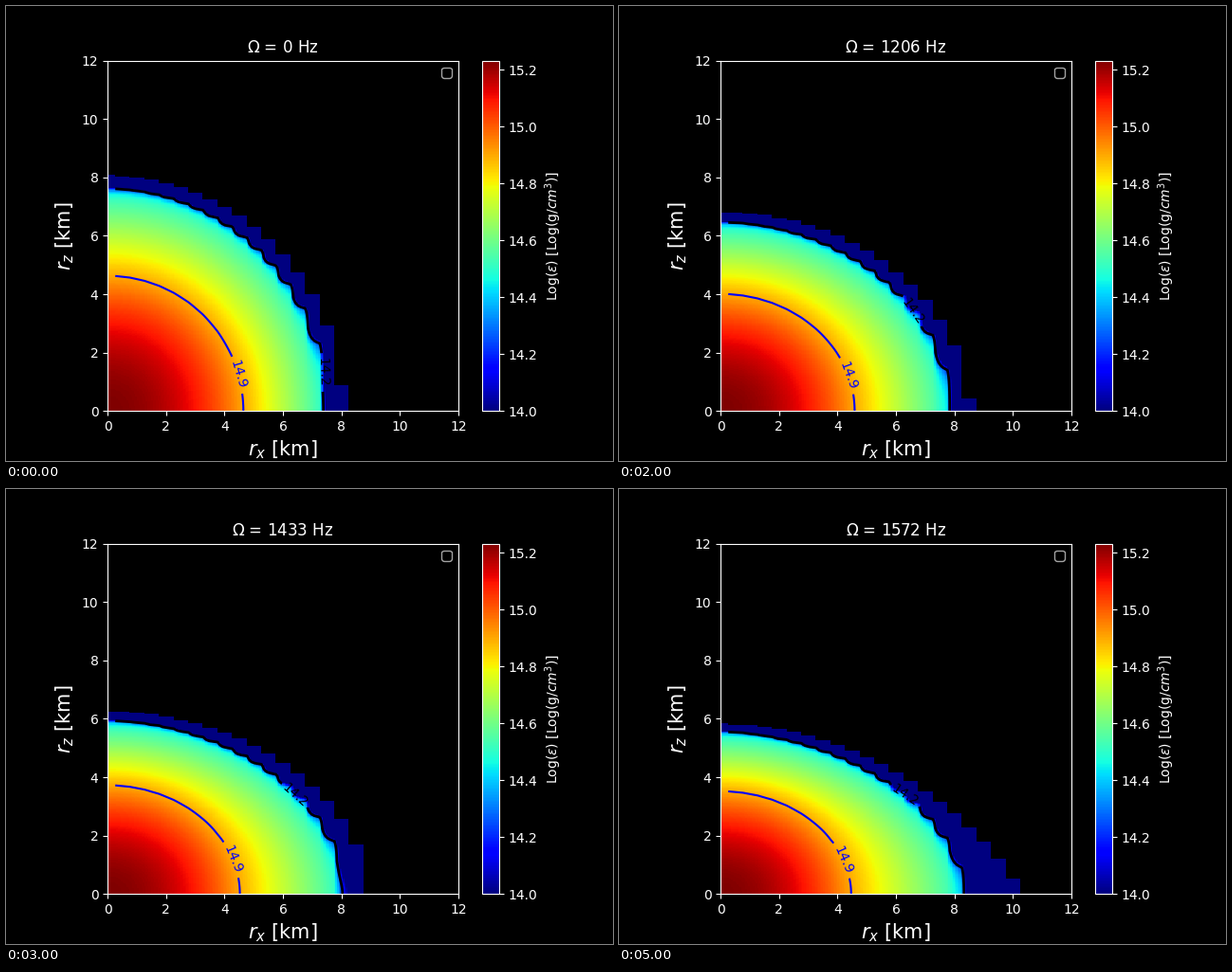
A matplotlib script for the animation above (6 s loop, 640x480 px).

```python
import numpy as np
import matplotlib.pyplot as plt
from matplotlib.animation import FuncAnimation

plt.style.use("dark_background")

SPINS = [0, 865, 1206, 1433, 1558, 1572]  # Hz
LOW, CORE, HIGH = 14.0, 14.9, 15.232
STEP, OFFSET = 0.5, 0.26  # sample spacing and first sample, in km


class Star:
    """Half-axes of the core, surface and crust for one spin."""

    def __init__(self, spin):
        w = (spin / SPINS[-1]) ** 2
        flat, bulge, shed = w**1.1, w**1.6, w**18
        self.core = (4.65 - 0.22 * w**2, 4.63 - 1.11 * flat, 2)
        self.surface = (7.62 + 0.8 * bulge, 7.62 - 2.06 * flat,
                        2 - 0.15 * w**3)
        self.crust = (8.05 + 1.1 * (bulge + shed), 8.06 - 2.23 * flat)
        self.crust_bend = 0.5 + 0.05 * bulge + 0.25 * shed
        self.surface_angle = 10 if w < 0.4 else 28

    def density(self, x, z):
        """Log density: parabolic core, linear mantle, steep outer drop."""
        core = gauge(x, z, *self.core)
        ratio = core / gauge(x, z, *self.surface)
        s = (core - 1) / (ratio - 1)  # 0 on the core, 1 on the surface
        t = np.clip(s, 0, 1)
        mantle = CORE - 0.43 * t - 0.27 * t**25
        outside = np.maximum(14.2 - 20 * (s - 1), 13)
        return np.where(core < 1, HIGH - (HIGH - CORE) * core**2,
                        np.where(s < 1, mantle, outside))

    def crust_top(self, x):
        a, b = self.crust
        return b * np.maximum(1 - (x / a) ** 2, 0) ** self.crust_bend


def gauge(x, z, a, b, n):
    """Scaled radius, 1 on the curve with half-axes a and b."""
    return ((x / a) ** n + (z / b) ** n) ** (1 / n)


def on_curve(angle, curve):
    """Point of a curve seen from the centre at an angle in degrees."""
    x, z = np.cos(np.radians(angle)), np.sin(np.radians(angle))
    r = 1 / gauge(x, z, *curve)
    return x * r, z * r


x_edges = np.arange(0, 11.001, 0.05)
z_edges = np.arange(0, 9.001, 0.04)
x_mid = (x_edges[:-1] + x_edges[1:]) / 2
z_mid = (z_edges[:-1] + z_edges[1:]) / 2
columns = OFFSET + STEP * np.arange(23)
stairs = STEP * np.round(x_mid / STEP)

# Weights for linear interpolation between the sample columns.
place = np.maximum((x_mid - OFFSET) / STEP, 0)
left = place.astype(int)
part = place - left


def cells(star):
    samples = star.density(columns, z_mid[:, None])
    field = samples[:, left] * (1 - part) + samples[:, left + 1] * part
    return np.ma.masked_where(z_mid[:, None] > star.crust_top(stairs), field)


fig, ax = plt.subplots(figsize=(6.4, 4.8), dpi=100)
mesh = ax.pcolormesh(x_edges, z_edges, cells(Star(0)),
                     cmap="jet", vmin=LOW, vmax=HIGH)
ax.set_aspect("equal")
ax.set_xlim(0, 12)
ax.set_ylim(0, 12)
ax.set_xlabel(r"$r_x$ [km]", fontsize=15)
ax.set_ylabel(r"$r_z$ [km]", fontsize=15)
title = ax.set_title("")
ax.legend([], [], loc="upper right")
fig.colorbar(mesh, ax=ax, label=r"Log($\epsilon$) [Log(g/$cm^3$)]")

lines = []


def draw_level(field, level, color, width, spot):
    curve = ax.contour(columns, z_edges, field, levels=[level],
                       colors=color, linewidths=width)
    ax.clabel(curve, fmt="%.1f", fontsize=10, manual=[spot])
    lines.append(curve)


def update(i):
    while lines:
        lines.pop().remove()
    star = Star(SPINS[i])
    mesh.set_array(cells(star))
    title.set_text(rf"$\Omega$ = {SPINS[i]} Hz")
    field = star.density(columns, z_edges[:, None])
    draw_level(field, CORE, "blue", 1.5, on_curve(15.5, star.core))
    draw_level(field, 14.2, "black", 2,
               on_curve(star.surface_angle, star.surface))
    return []


anim = FuncAnimation(fig, update, frames=len(SPINS), interval=1000,
                     init_func=lambda: update(0), repeat=True,
                     repeat_delay=0, blit=False)
plt.show()
```
